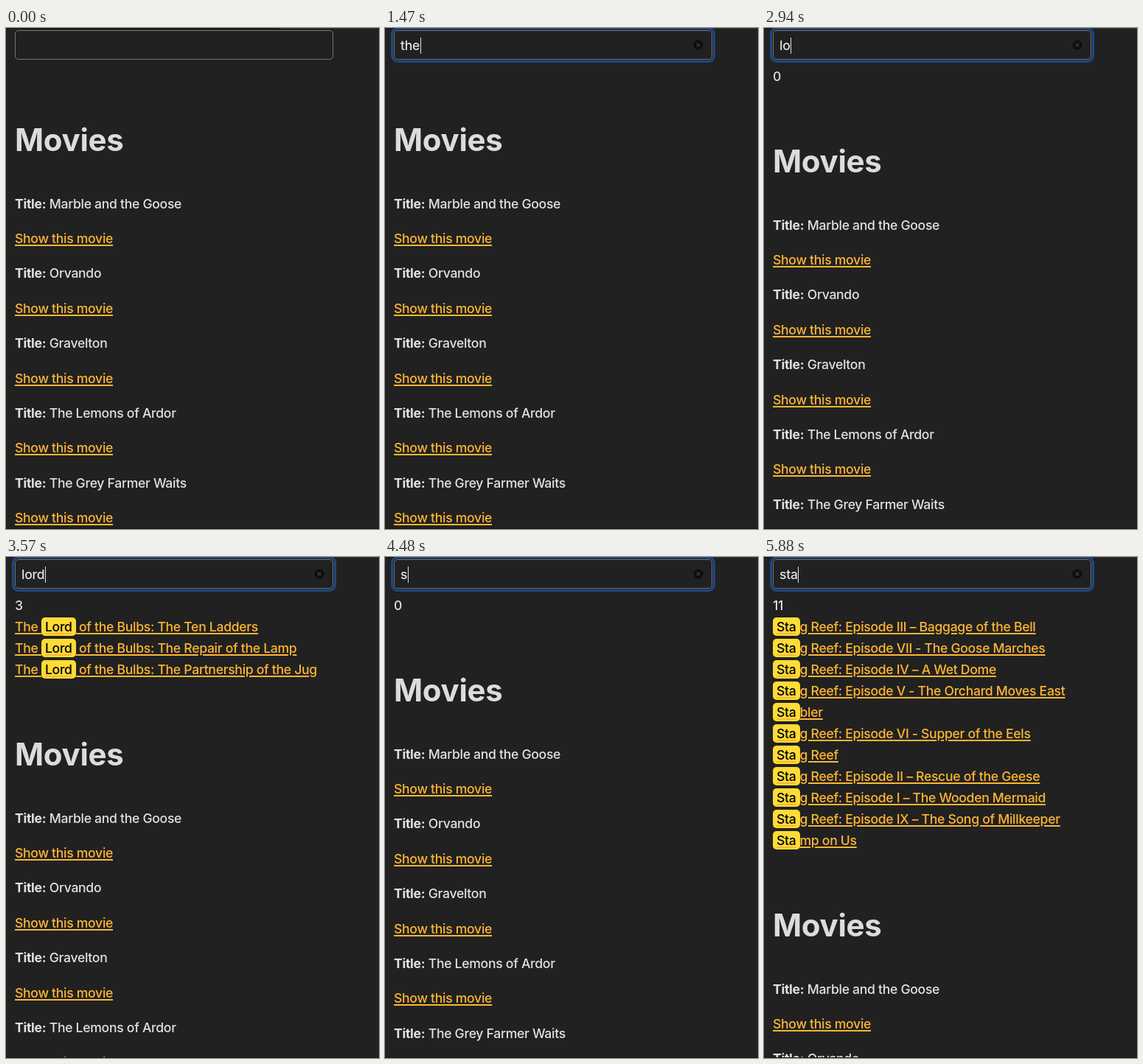
Write an HTML page that moves like this. It is 506 px wide and 680 px high and loops after 6.16 s.

```html
<!DOCTYPE html>
<html lang="en">
<head>
<meta charset="utf-8">
<title>Movie search</title>
<style>
  html, body { margin: 0; width: 100%; height: 100%; overflow: hidden; background: #212121; }
  #stage {
    position: relative; width: 506px; height: 680px; overflow: hidden;
    background: #212121; color: #e2e2e2; white-space: nowrap;
    font: 450 17.6px/29px Inter, Roboto, sans-serif; letter-spacing: -.3px;
  }
  #edge { position: absolute; top: 0; left: 0; width: 506px; height: 1px;
    background: linear-gradient(90deg, #141414 371px, #383838 371px); }
  #foot { position: absolute; bottom: 0; left: 0; width: 506px; height: 1px; background: #161616; }
  #field {
    position: absolute; left: 12px; top: 3px; width: 432px; height: 40px;
    box-sizing: border-box; border: 1px solid #747474; border-radius: 5px;
  }
  #ring { position: absolute; inset: -1px; border-radius: 5px; outline: 3px solid #1d4788; }
  #text { position: absolute; left: 8px; top: 5px; white-space: pre; }
  #caret {
    display: inline-block; width: 1px; height: 22px; margin-left: .5px;
    vertical-align: -5px; background: #e0e0e0;
  }
  #clear { position: absolute; left: 405px; top: 12px; width: 14px; height: 14px; }
  #page { position: absolute; left: 12px; top: 51px; }
  #hits div { height: 29px; }
  a { color: #ffb633; text-decoration: underline; text-decoration-thickness: 1.5px; text-underline-offset: 2px; }
  mark { background: #ffdb36; color: #000; border-radius: 5px; padding: 2px 5px; }
  h1 { margin: 78px 0 39.8px; color: #dcdcdc; font-size: 42px; line-height: 46px; font-weight: 700; letter-spacing: -.3px; }
  p { margin: 0; height: 47.35px; line-height: 47.35px; }
</style>
</head>
<body>
<div id="stage">
  <div id="page"><div id="hits"></div><h1>Movies</h1><div id="list"></div></div>
  <div id="edge"></div>
  <div id="foot"></div>
  <div id="field">
    <div id="ring"></div>
    <div id="text"><span id="typed"></span><span id="caret"></span></div>
    <svg id="clear" viewBox="0 0 14 14">
      <circle cx="7" cy="7" r="6.5" fill="#0e0e0e"/>
      <path d="M4.7 4.7l4.6 4.6M9.3 4.7l-4.6 4.6" stroke="#3c3c3c" stroke-width="1.3"/>
    </svg>
  </div>
</div>
<script>
const LOOP = 6160, FOCUS = 490;
const saga = 'Stag Reef', lord = 'The Lord of the Bulbs: The ';

const films = [
  'Marble and the Goose', 'Orvando', 'Gravelton', 'The Lemons of Ardor',
  'The Grey Farmer Waits', 'The Gardener Clock', 'The Wet Marzonki', 'The Oat',
  'The Crow of Salt Manor', saga + ': Episode III – Baggage of the Bell',
  'The Trivet', 'The Third Jug', saga + ': Episode VII - The Goose Marches',
  'The Quiet Almondry Cabin', 'The Early Plumbers', 'Muddy Walrus and the Tidy Plum',
  'Gradual Exercise of the Crumpled Coat', 'The Umbrella of the Copper Ridge',
  lord + 'Ten Ladders', saga + ': Episode IV – A Wet Dome',
  saga + ': Episode V - The Orchard Moves East', 'The Unpacked', 'The Brisk Milliner',
  'Farmers of the Lone Ivy', 'Stabler', saga + ': Episode VI - Supper of the Eels', saga,
  lord + 'Repair of the Lamp', saga + ': Episode II – Rescue of the Geese',
  lord + 'Partnership of the Jug', saga + ': Episode I – The Wooden Mermaid',
  saga + ': Episode IX – The Song of Millkeeper', 'Stamp on Us',
  'A Loaf, a Lobster and Eleven Borrowed Umbrellas', 'Lockwood Ferry', 'Low Tide Bakery',
  'The Long Ladder Home', 'Loose Buttons', 'Lost Kettle Valley', 'A Lot of Marmalade',
  'Lofty Pines Motel', 'The Lodger’s Piano', 'Longer Than Winter',
  'Local Weather Choir', 'Loyal as Gravel', 'Love and Linoleum', 'Loud Paper Birds'
];
const totals = { the: 56, th: 61 };

// [time, typed text]
const keys = [
  [0, ''], [FOCUS, ''], [1330, 't'], [1400, 'th'], [1470, 'the'],
  [2170, 'th'], [2380, 't'], [2590, ''], [2870, 'l'], [2940, 'lo'],
  [3150, 'lor'], [3430, 'lord'], [3850, 'lor'], [3990, 'lo'], [4130, 'l'],
  [4270, ''], [4410, 's'], [4760, 'st'], [4830, 'sta']
];
// [time, answered query]; null shows no answer at all
const answers = [
  [0, null], [1610, 'the'], [2310, 'th'], [2520, ''], [3080, 'lo'], [3290, 'lor'],
  [3570, 'lord'], [3990, 'lor'], [4130, 'lo'], [4270, ''], [4970, 'sta']
];

const $ = id => document.getElementById(id);
const at = (steps, t) => steps.findLast(s => s[0] <= t);

function answerHtml(query) {
  if (query === null) return '';
  if (!query) return '<div>0</div>';
  const word = new RegExp('\\b' + query, 'i');
  const every = new RegExp('\\b' + query, 'gi');
  const found = films.filter(f => word.test(f));
  return `<div>${totals[query] || found.length}</div>` +
    found.map(f => `<div><a>${f.replace(every, '<mark>$&</mark>')}</a></div>`).join('');
}

$('list').innerHTML = films.slice(0, 5)
  .map(f => `<p><b>Title:</b> ${f}</p><p><a>Show this movie</a></p>`).join('');

let shown;
function draw(t) {
  const [pressed, text] = at(keys, t);
  const query = at(answers, t)[1];
  if (query !== shown) $('hits').innerHTML = answerHtml(shown = query);

  const focused = t >= FOCUS;
  $('typed').textContent = text;
  $('caret').style.opacity = focused && (t - pressed) % 1050 < 560 ? 1 : 0;
  $('clear').style.display = text ? '' : 'none';

  const p = Math.min(1, (t - FOCUS + 70) / 280);
  $('ring').style.opacity = focused ? p : 0;
  $('ring').style.outlineOffset = `${1 + 3 * (1 - p)}px`;
}

const start = performance.now();
function tick() {
  draw((performance.now() - start) % LOOP);
  requestAnimationFrame(tick);
}
tick();
</script>
</body>
</html>
```
